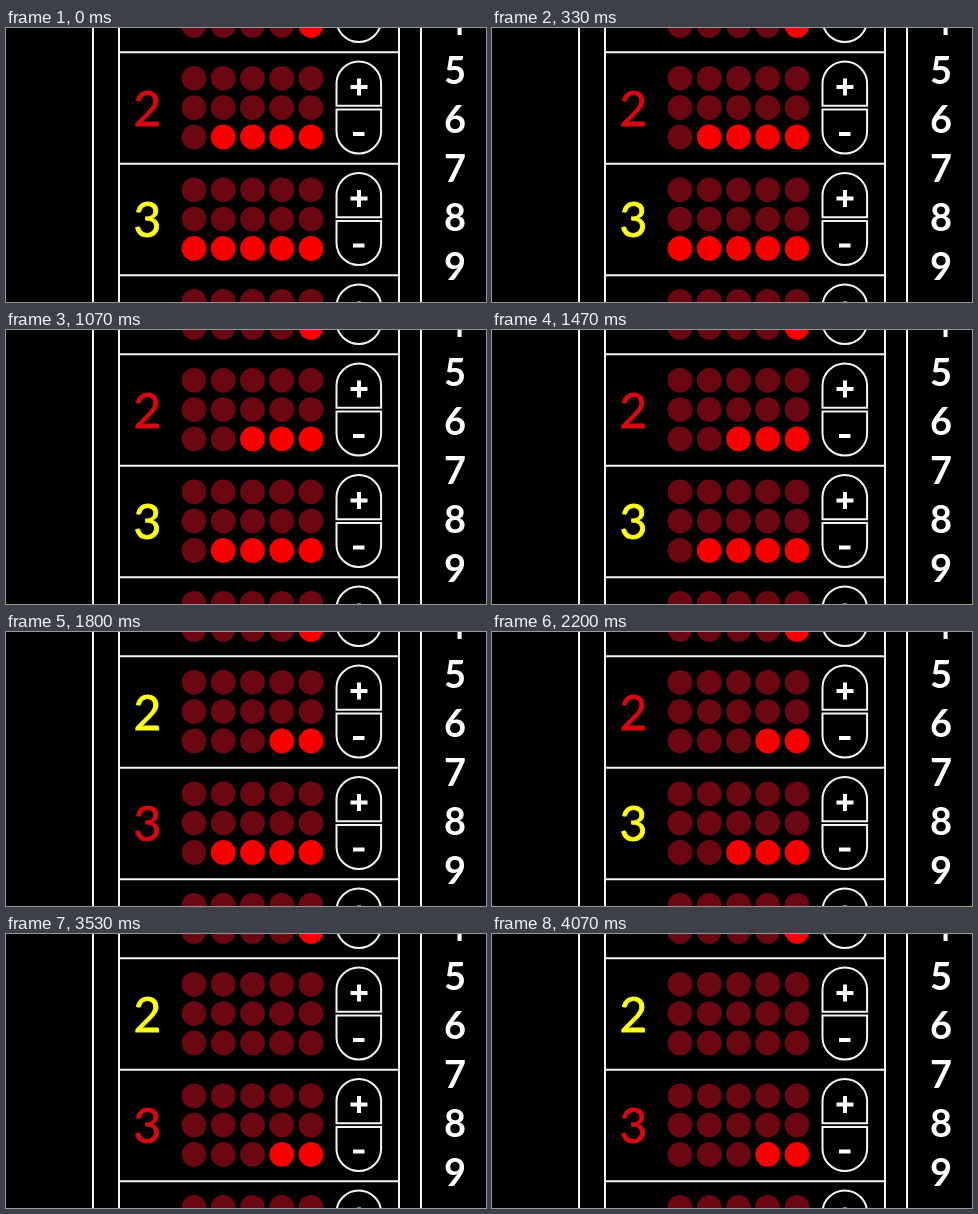
An HTML page that plays this animation: 480 px wide and 274 px high, repeating every 4140 ms.

```html
<!DOCTYPE html>
<html lang="en">
<head>
<meta charset="utf-8">
<title>Counter board</title>
<style>
html, body { margin: 0; width: 100%; height: 100%; overflow: hidden; background: #000; }
svg { display: block; width: 480px; height: 274px; }
text { font-family: Lato, "Open Sans", sans-serif; text-anchor: middle; }
.label { font-size: 48px; font-weight: 400; stroke-width: .8; }
.score { font-size: 38px; font-weight: 700; fill: #fff; }
.line { fill: none; stroke: #f4f4f4; stroke-width: 2; }
.sign { fill: none; stroke: #fff; stroke-width: 4; }
</style>
</head>
<body>
<svg id="stage" viewBox="0 0 480 274"></svg>
<script>
const LOOP = 4140, PITCH = 111.5, COLS = 5, ROWS = 3;
const DIM = '#6b0711', LIT = '#f80000', IDLE = '#d80812', ACTIVE = '#ffff18';
// Moments at which rows 2 and 3 take turns losing a light
const MOVES = [530, 1070, 1530, 2070, 2530, 3070, 3530];
const stage = document.getElementById('stage');

function add(tag, attrs, text) {
  const el = document.createElementNS('http://www.w3.org/2000/svg', tag);
  for (const key in attrs) el.setAttribute(key, attrs[key]);
  if (text !== undefined) el.textContent = text;
  return stage.appendChild(el);
}

function makeRow(n) {
  const top = 24.3 + (n - 2) * PITCH;
  const shift = `translate(0 ${top})`;
  const dots = [];
  add('path', { class: 'line', d: `M113 ${top}H393` });
  for (let i = 0; i < COLS * ROWS; i++) {
    dots.push(add('circle', {
      cx: 188 + (i % COLS) * 29.25,
      cy: top + 26 + Math.floor(i / COLS) * 29.3,
      r: 12.4
    }));
  }
  add('path', { class: 'line', transform: shift,
    d: 'M330.5 53.5V31.5a22.3 22.3 0 0 1 44.6 0V53.5ZM330.5 57.2V79a22.3 22.3 0 0 0 44.6 0V57.2Z' });
  add('path', { class: 'sign', transform: shift,
    d: 'M344.5 34.7h17M353 26.2v17M347 81.7h11.5' });
  const label = add('text', { class: 'label', x: 141.5, y: top + 73.5 }, n);
  return { dots, label };
}

function setRow(row, count, color) {
  row.dots.forEach((dot, i) => {
    dot.setAttribute('fill', i >= COLS * ROWS - count ? LIT : DIM);
  });
  row.label.setAttribute('fill', color);
  row.label.setAttribute('stroke', color);
}

const rows = [1, 2, 3, 4].map(makeRow);
for (const x of [87, 113, 393, 415]) add('path', { class: 'line', d: `M${x} -2V276` });
for (let n = 4; n <= 9; n++) {
  add('text', { class: 'score', x: 449, y: 55.8 + (n - 5) * 49 }, n);
}
setRow(rows[0], 1, IDLE);
setRow(rows[3], 0, IDLE);

let shown = -1;
function draw(t) {
  const done = MOVES.filter(m => t >= m).length;
  if (done === shown) return;
  shown = done;
  const second = done % 2 === 1;
  setRow(rows[1], 4 - Math.ceil(done / 2), second ? ACTIVE : IDLE);
  setRow(rows[2], 5 - Math.floor(done / 2), second ? IDLE : ACTIVE);
}

const start = performance.now();
function tick() {
  draw((performance.now() - start) % LOOP);
  requestAnimationFrame(tick);
}
tick();
</script>
</body>
</html>
```
